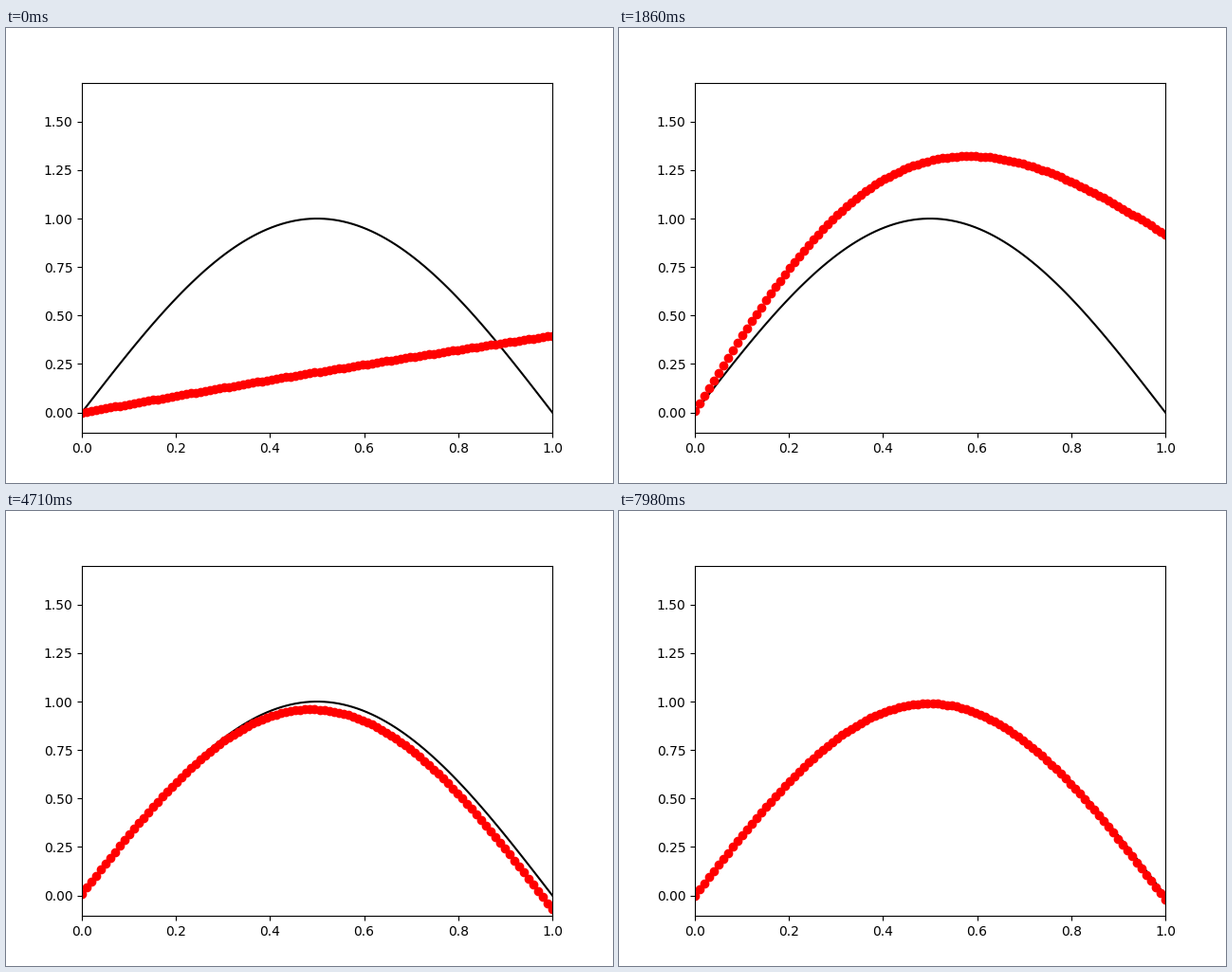
A matplotlib script that plays this animation: 640x480 px, repeating every 8 s.

```python
import numpy as np
import matplotlib.pyplot as plt
from matplotlib.animation import FuncAnimation

LOOP = 8000
STEP = 30
FRAMES = 267

# Key points of the two main parts of the fit: right end height and arch height
TIMES = np.array([0, 500, 1050, 1860, 2880, 4150, 6000, 8000])
END = np.array([0.396, 1.6, 1.236, 0.919, 0.438, -0.078, -0.046, -0.020])
ARCH = np.array([0.010, 0.84, 0.877, 0.842, 0.930, 0.988, 0.996, 1.0])


def track(values, t):
    """Smooth monotone interpolation that rests at turning points."""
    h = np.diff(TIMES)
    d = np.diff(values) / h
    before, after = d[:-1], d[1:]
    inner = np.where(before * after > 0,
                     2 * before * after / (before + after), 0)
    m = np.concatenate([d[:1], inner, d[-1:]])
    i = np.searchsorted(TIMES, t, side="right") - 1
    s = (t - TIMES[i]) / h[i]
    ease = s * s * (3 - 2 * s)
    bend = s * (1 - s) * ((1 - s) * m[i] - s * m[i + 1])
    return values[i] + (values[i + 1] - values[i]) * ease + h[i] * bend


def bump(t, centre, width):
    return np.exp(-((t - centre) / width)**2)


def fit_at(t):
    """Straight line between the ends plus three sine waves."""
    start = 0.025 * bump(t, 3400, 1300) - 0.03 * bump(t, 400, 200)
    skew = 0.212 * (1 - bump(t, 0, 600)) * np.exp(-t / 1300)
    line = start * (1 - x) + track(END, t) * x
    waves = (track(ARCH, t), skew, skew / 8)
    return line + sum(amp * np.sin(k * np.pi * x)
                      for k, amp in enumerate(waves, 1))


x = np.linspace(0, 1, 100)

fig, ax = plt.subplots(figsize=(6.4, 4.8), dpi=100)
ax.plot(x, np.sin(np.pi * x), "k-")
dots, = ax.plot(x, fit_at(0), "ro")
ax.set_xlim(0, 1)
ax.set_ylim(-0.1059, 1.7014)


def update(frame):
    dots.set_ydata(fit_at(frame * STEP))
    return dots,


anim = FuncAnimation(fig, update, frames=FRAMES, interval=LOOP / FRAMES,
                     repeat=True, repeat_delay=0, blit=False)
plt.show()
```
